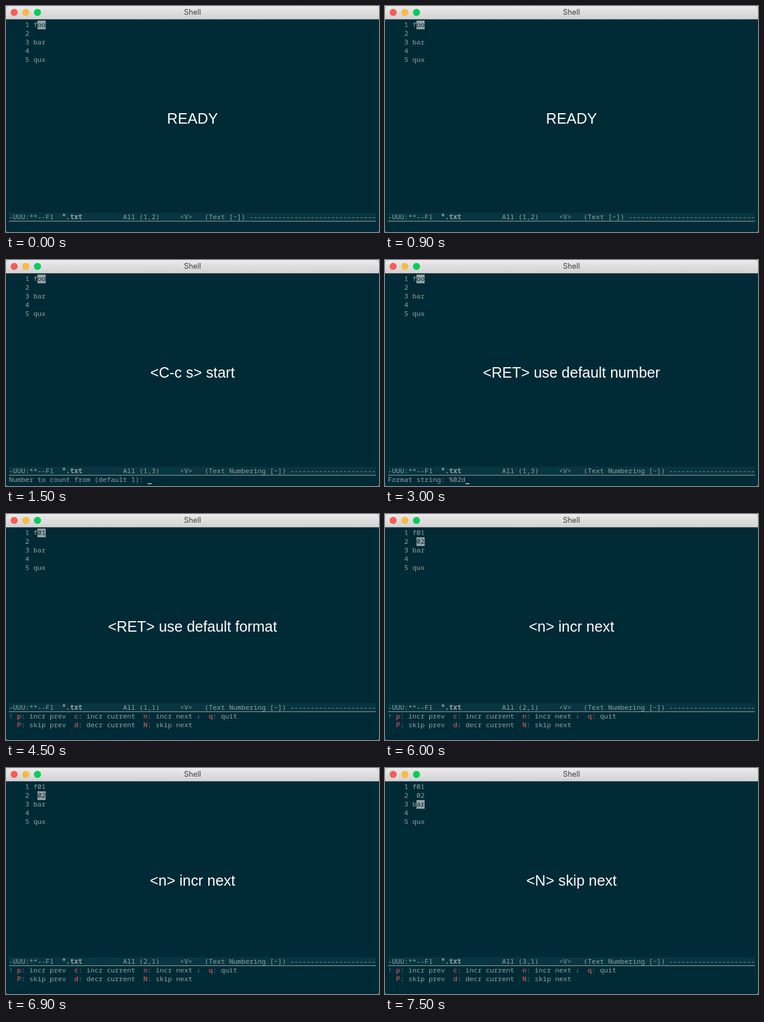
An HTML page for the animation above (8 s loop, 640 px wide and 388 px high).

```html
<!DOCTYPE html>
<html lang="en">
<head>
<meta charset="utf-8">
<title>Shell</title>
<style>
  html, body { margin: 0; width: 100%; height: 100%; overflow: hidden; background: #fff; }
  #window {
    position: relative; width: 640px; height: 388px; overflow: hidden;
    background: #002b36; border-radius: 5px 5px 2px 2px;
  }
  header {
    height: 23px; box-sizing: border-box; border-bottom: 1px solid #b4b4b4;
    background: linear-gradient(#ebebeb, #d2d2d2); border-radius: 5px 5px 0 0;
    font: 12.8px/22px Inter, sans-serif; color: #404040; text-align: center;
  }
  header i {
    position: absolute; top: 5px; width: 12px; height: 12px; box-sizing: border-box;
    border: 1px solid rgba(0, 0, 0, .06); border-radius: 50%;
  }
  pre {
    position: absolute; left: 5px; width: 630px; margin: 0;
    font: 11.667px/15px "Noto Sans Mono", "DejaVu Sans Mono", monospace; color: #93a1a1;
  }
  /* Text sits one pixel above the middle of its cell. */
  pre { margin-top: -1px; }
  #status, mark, u { height: 15px; line-height: 13px; }
  #status { margin-top: 0; background: #073642; box-shadow: inset 0 -1px #93a1a1; }
  mark, u { position: relative; top: 1px; display: inline-block; vertical-align: top; }
  mark { background: #93a1a1; color: #002b36; }
  u { width: 7px; box-shadow: inset 0 -2px #93a1a1; }
  em { font-style: normal; color: #f4605c; }
  #caption {
    position: absolute; top: 178px; width: 100%; text-align: center; white-space: pre;
    font: 25.33px/30px "Liberation Sans", Arial, sans-serif; color: #fff;
  }
</style>
</head>
<body>
<div id="window">
  <header>
    <i style="left:8px;background:#fc5b57"></i>
    <i style="left:28px;background:#fdbc40"></i>
    <i style="left:48px;background:#00cf58"></i>
    Shell
  </header>
  <pre id="buffer"></pre>
  <pre id="status"></pre>
  <pre id="echo"></pre>
  <div id="caption"></div>
</div>
<script>
const LOOP = 8000, STEP = 1500, COLUMNS = 90, ROW = 15, TOP = 25;
const byId = id => document.getElementById(id);
const placeAtRow = (id, row) => byId(id).style.top = TOP + row * ROW + 'px';

// Square brackets select text, an underscore is the cursor.
const markup = text => text
  .replace(/\[(.+?)\]/g, '<mark>$1</mark>')
  .replace('_', '<u></u>');

const menu = [
  '↑ p: incr prev  c: incr current  n: incr next ↓  q: quit',
  '  P: skip prev  d: decr current  N: skip next'
].join('\n').replace(/\w(?=:)/g, '<em>$&</em>');

const ready = 'f[oo]||bar||qux';
const steps = [
  { caption: 'READY', lines: ready, at: '1,2', mode: 'Text', echo: '' },
  { caption: '<C-c s> start', lines: ready, at: '1,3', echo: 'Number to count from (default 1): _' },
  { caption: '<RET> use default number', lines: ready, at: '1,3', echo: 'Format string: %02d_' },
  { caption: '<RET> use default format', lines: 'f[01]||bar||qux', at: '1,1' },
  { caption: '<n> incr next', lines: 'f01| [02]|bar||qux', at: '2,1' },
  { caption: '<N> skip next', lines: 'f01| 02|b[ar]||qux', at: '3,1' }
];

function statusLine({ at, mode = 'Text Numbering' }) {
  return `-UUU:**--F1  *.txt          All (${at})     <V>   (${mode} [~]) `
    .padEnd(COLUMNS, '-')
    .replace('<V>', '&lt;V&gt;')
    .replace('*.txt', '<b>$&</b>');
}

function show(step) {
  const hasMenu = step.echo === undefined;
  const statusRow = hasMenu ? 20 : 22;
  byId('caption').textContent = step.caption;
  byId('buffer').innerHTML = step.lines.split('|')
    .map((line, i) => `    ${i + 1} ${markup(line)}`).join('\n');
  byId('status').innerHTML = statusLine(step);
  byId('echo').innerHTML = hasMenu ? menu : markup(step.echo);
  placeAtRow('buffer', 0);
  placeAtRow('status', statusRow);
  placeAtRow('echo', statusRow + 1);
}

let shown;
function tick() {
  const step = steps[Math.floor(performance.now() % LOOP / STEP)];
  if (step !== shown) show(shown = step);
  requestAnimationFrame(tick);
}
tick();
</script>
</body>
</html>
```
